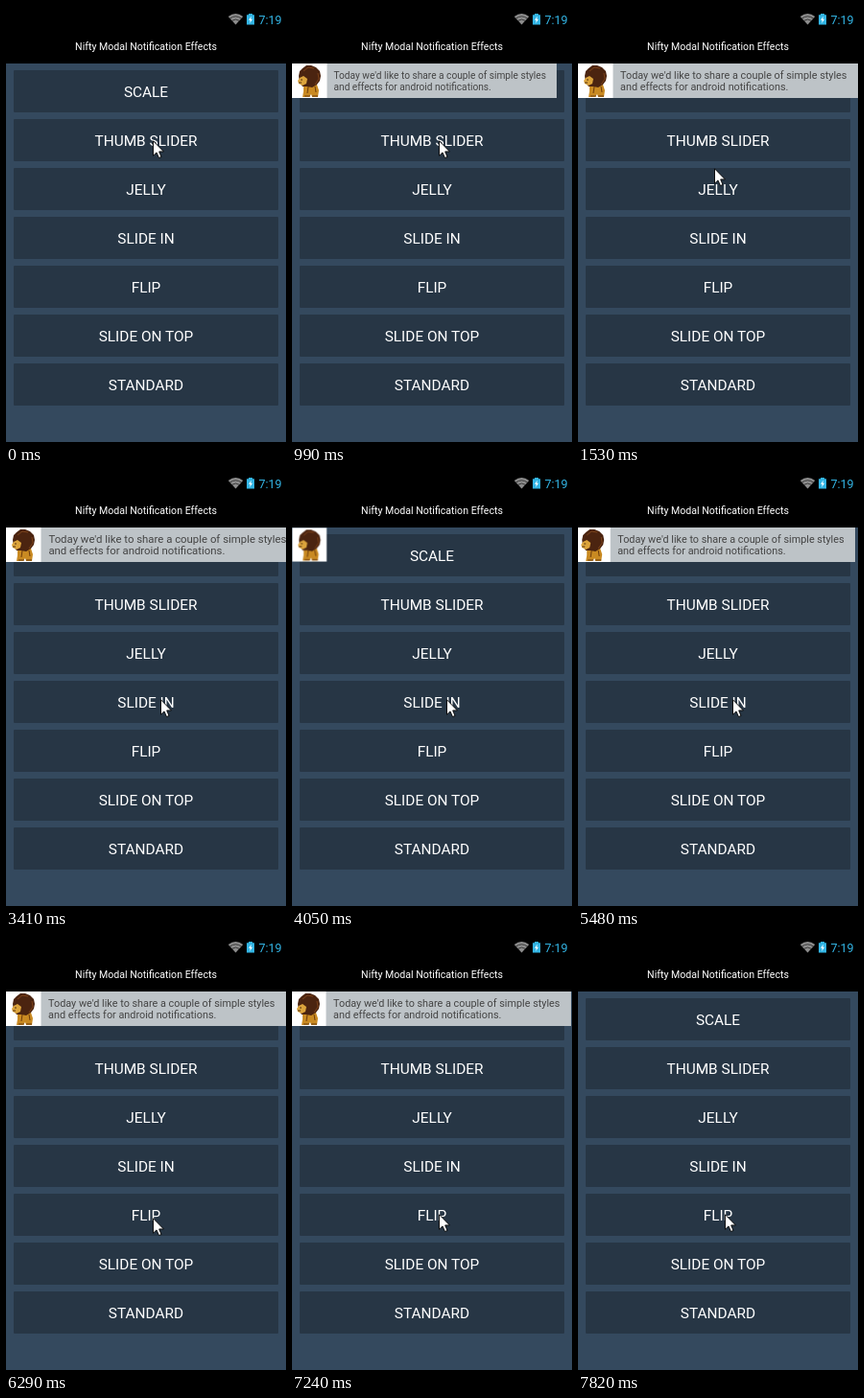
Write an HTML page that moves like this. It is 292 by 455 pixels and loops after 8 s.

```html
<!DOCTYPE html>
<html lang="en">
<head>
<meta charset="utf-8">
<title>Nifty Modal Notification Effects</title>
<style>
  html, body { margin: 0; width: 100%; height: 100%; overflow: hidden; background: #000; }
  svg { display: block; width: 292px; height: 455px; font-family: Roboto, "Noto Sans", sans-serif; }
  .title { font-size: 10.6px; fill: #fff; text-anchor: middle; }
  .clock { font-size: 12.5px; fill: #33b5e5; text-anchor: end; }
  .button { fill: #273645; }
  .label { font-size: 15.4px; fill: #fff; text-anchor: middle; }
  .message { font-size: 10.85px; fill: #444; }

  /* The screen updates in hard steps, so every track holds its pose. */
  .track { animation: 8s step-end infinite; }
  #thumb { animation-name: thumb; transform-origin: 18px 78px; }
  #sheet { animation-name: sheet; transform-origin: 36px 78px; }
  #slide { animation-name: slide; }
  #cursor { animation-name: cursor; }
  #press { animation-name: press; }

  @keyframes thumb {
    0% { transform: scale(0); }
    4.875% { transform: scale(.61); }
    6.875% { transform: scale(1); }
    49% { transform: scale(1.05); }
    50.625% { transform: scale(.98); }
    52.5%, 100% { transform: scale(0); }
  }
  @keyframes sheet {
    0% { transform: scaleX(0); }
    12.375% { transform: scaleX(.9375); }
    14.25% { transform: scaleX(1.17); }
    16.125% { transform: scaleX(1.1); }
    17.625% { transform: scaleX(1.04); }
    19.125% { transform: scaleX(1); }
    42.625% { transform: scaleX(1.05); }
    44.125% { transform: scaleX(1.15); }
    45.625% { transform: scaleX(.7); }
    47.125%, 100% { transform: scaleX(0); }
  }
  @keyframes slide {
    0% { transform: translateX(-300px); }
    61.625% { transform: translateX(-285px); }
    63.25% { transform: translateX(-240px); }
    65.125% { transform: translateX(-70px); }
    66.625% { transform: translateX(-3.5px); }
    68.5% { transform: translateX(-2.8px); }
    70.375% { transform: translateX(0); }
    90.5% { transform: translateX(-1px); }
    92.375% { transform: translateX(-2px); }
    94.25% { transform: translateX(70px); }
    95.75% { transform: translateX(243px); }
    97.75%, 100% { transform: translateX(300px); }
  }
  @keyframes cursor {
    0% { transform: translate(153px, 140px); }
    17.625% { transform: translate(149px, 152px); }
    19.125% { transform: translate(142px, 169px); }
    21% { transform: translate(141px, 198px); }
    24.5% { transform: translate(150px, 216px); }
    26% { transform: translate(161px, 237px); }
    27.875% { transform: translate(161px, 239px); }
    70.375% { transform: translate(160px, 242px); }
    75.25% { transform: translate(157px, 270px); }
    76.75% { transform: translate(153px, 301px); }
    78.625% { transform: translate(153px, 296px); }
    80.125%, 100% { transform: translate(153px, 292px); }
  }
  @keyframes press {
    0%, 3%, 61.625%, 100% { opacity: 0; }
    1.5%, 59.875% { opacity: 1; }
  }
</style>
</head>
<body>
<svg viewBox="0 0 292 455">
  <defs>
    <clipPath id="strip"><rect y="60" width="292" height="36"/></clipPath>
    <g id="icon">
      <rect y="60" width="36.5" height="36" fill="#fff"/>
      <path d="M12 82h14l2 6-1 7h-6l-1-3-2 3h-7l1-6z" fill="#c98a22"/>
      <path d="M13 94h6M21 94h6M17 84l-1 7M24 84l1 6" stroke="#6b3a0c" fill="none"/>
      <path d="M7 73l1-5 3-3 4-3 5 0 5 2 4 4 1 5-1 5-3 4-5 3-5-1-5 0-3-4z" fill="#4b2410"/>
      <path d="M12 68l5-4 6 1M27 70l1 6-4 6" stroke="#7c421a" fill="none"/>
      <path d="M8 75l4-2 4 3-1 5-4 2-4-2-1-3z" fill="#dca43c"/>
      <path d="M9 77h2M7 80h3" stroke="#54300f"/>
    </g>
    <g id="text">
      <rect x="36" y="60" width="256" height="36" fill="#bdc3c7"/>
      <g class="message">
        <text x="44" y="76">Today we'd like to share a couple of simple styles</text>
        <text x="44" y="88.3">and effects for android notifications.</text>
      </g>
    </g>
  </defs>

  <rect width="292" height="455"/>
  <rect y="60" width="292" height="395" fill="#34495e"/>
  <text class="title" x="146" y="46">Nifty Modal Notification Effects</text>

  <g id="status">
    <path d="M239.5 19.5l-7.7-8.6q7.7-5.6 15.4 0z" fill="#8c8c8c"/>
    <path d="M233.5 13q6-4.3 12 0M235.6 15.4q3.9-2.8 7.8 0" stroke="#222" stroke-width=".8" fill="none"/>
    <path d="M253 8h4v1.3h2v10.2h-8V9.3h2z" fill="#33b5e5"/>
    <path d="M255.8 10.8l-2.8 4h1.8l-.7 3.2 3-4.3h-1.9z" fill="#fff"/>
    <text class="clock" x="287.5" y="18.5">7:19</text>
  </g>

  <g id="menu"></g>

  <g clip-path="url(#strip)">
    <g id="sheet" class="track"><use href="#text"/></g>
    <g id="thumb" class="track"><use href="#icon"/></g>
    <g id="slide" class="track"><use href="#text"/><use href="#icon"/></g>
  </g>

  <g id="cursor" class="track">
    <g id="press" class="track" fill="none">
      <circle cx="1.5" cy="1.5" r="10" stroke="#000"/>
      <circle cx="1.5" cy="1.5" r="9" stroke="#fff"/>
    </g>
    <path d="M.5 .8V16.2L4 12.9 6.5 18.5 9 17.5 6.7 11.9H11.4z" fill="#fff" stroke="#000" stroke-width=".9"/>
  </g>
</svg>
<script>
  const names = ["SCALE", "THUMB SLIDER", "JELLY", "SLIDE IN", "FLIP", "SLIDE ON TOP", "STANDARD"];
  const top0 = 67, pitch = 51;

  document.getElementById("menu").innerHTML = names.map((name, i) => {
    const y = top0 + i * pitch;
    return `<rect class="button" x="8" y="${y}" width="276" height="44" rx="1"/>
      <text class="label" x="146" y="${y + 28.3}">${name}</text>`;
  }).join("");
</script>
</body>
</html>
```
